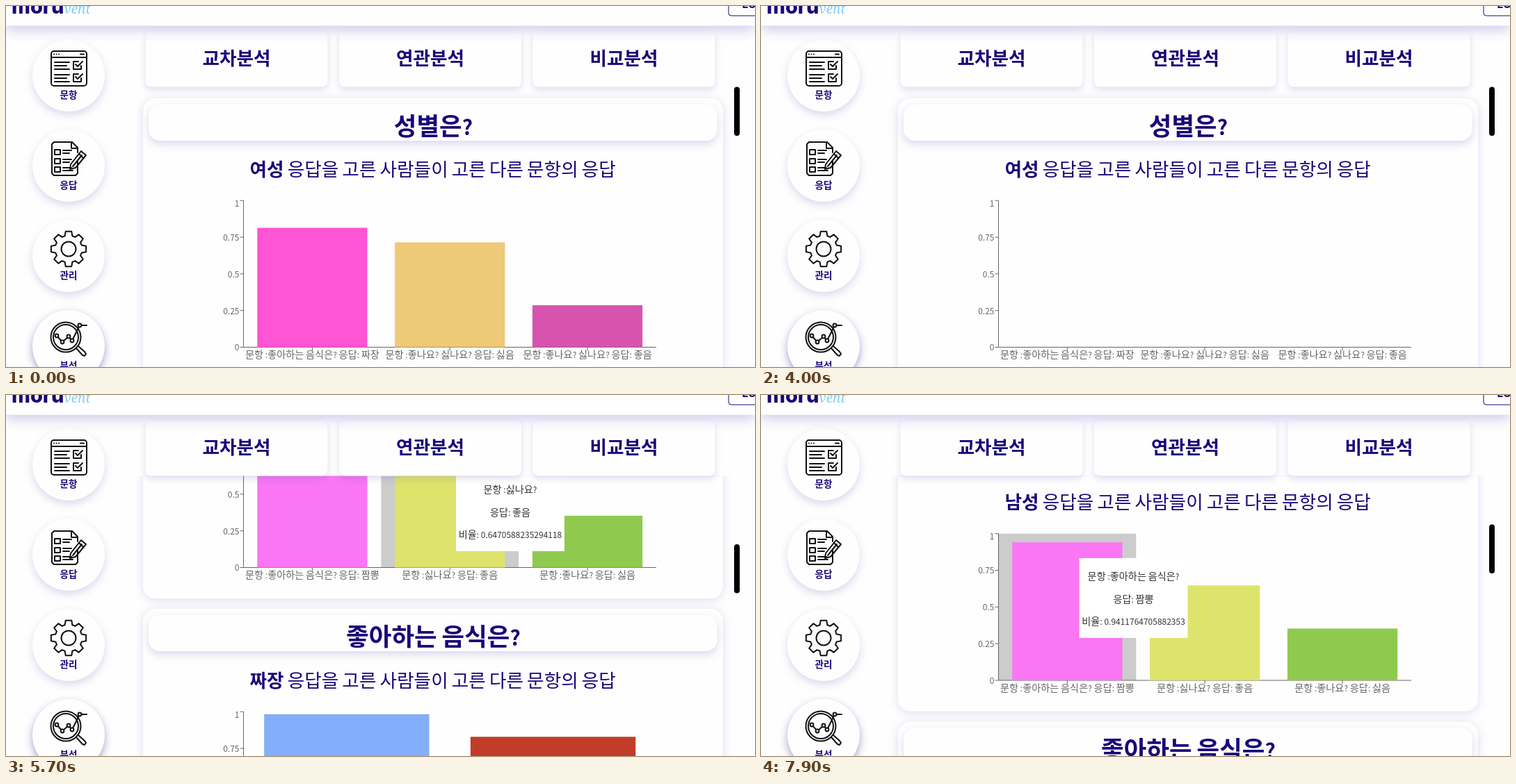
An HTML page with a canvas for the animation above (8000 ms loop, 1077 by 520 pixels).

```html
<!DOCTYPE html>
<html lang="ko">
<head>
<meta charset="utf-8">
<title>설문 분석</title>
<style>
html, body { margin: 0; width: 100%; height: 100%; overflow: hidden; background: #fefefe; }
canvas { display: block; width: 1077px; height: 520px; }
</style>
</head>
<body>
<canvas id="stage" width="1077" height="520"></canvas>
<script>
const ctx = document.getElementById('stage').getContext('2d');
const LOOP = 8000, STEP = 100;
const NAVY = '#1a0778', PAPER = '#fefefe', GREY = '#666';
const RED = '#f42a55', BLUE = '#82b1da';
const KR = '"Noto Sans CJK KR", "Noto Sans CJK JP", sans-serif';
const LATIN = 0.845;
const VIEW_TOP = 116.5;
const PLOT = { x: 341.5, w: 593.5, h: 211.3 };

// ---- timing helpers ----
const clamp = v => Math.max(0, Math.min(1, v));
const lerp = (a, b, k) => a + (b - a) * k;

// cubic-bezier(.25, .1, .25, 1)
function ease(x) {
  x = clamp(x);
  if (x === 0 || x === 1) return x;
  const at = (s, a, b) => 3 * (1 - s) * (1 - s) * s * a + 3 * (1 - s) * s * s * b + s * s * s;
  let lo = 0, hi = 1;
  for (let i = 0; i < 24; i++) {
    const mid = (lo + hi) / 2;
    if (at(mid, 0.25, 0.25) < x) lo = mid; else hi = mid;
  }
  return at(lo, 0.1, 1);
}

function track(t, keys) {
  if (t <= keys[0][0]) return keys[0][1];
  for (let i = 1; i < keys.length; i++) {
    const [t0, a] = keys[i - 1], [t1, b] = keys[i];
    if (t <= t1) return lerp(a, b, (t - t0) / (t1 - t0));
  }
  return keys[keys.length - 1][1];
}

const scrollAt = t => track(t, [
  [4600, 0], [4700, 11], [4800, 75], [5100, 320], [5200, 384],
  [5400, 560], [6900, 560], [7900, 397.5]
]);

// ---- drawing helpers ----
function shape(x, y, w, h, r, fill, shadow) {
  ctx.save();
  if (shadow) [ctx.shadowColor, ctx.shadowOffsetY, ctx.shadowBlur] = shadow;
  ctx.fillStyle = fill;
  ctx.beginPath();
  ctx.roundRect(x, y, w, h, r);
  ctx.fill();
  ctx.restore();
}

function rect(x, y, w, h, fill) {
  ctx.fillStyle = fill;
  ctx.fillRect(x, y, w, h);
}

function line(points, close) {
  ctx.beginPath();
  points.forEach(([x, y], i) => i ? ctx.lineTo(x, y) : ctx.moveTo(x, y));
  if (close) ctx.closePath();
  ctx.stroke();
}

function ring(x, y, r) {
  ctx.beginPath();
  ctx.arc(x, y, r, 0, 7);
  ctx.stroke();
}

function dot(x, y, r, fill) {
  ctx.fillStyle = fill;
  ctx.beginPath();
  ctx.arc(x, y, r, 0, 7);
  ctx.fill();
}

// Latin runs are set a little smaller than Hangul; y is the visual middle.
function text(str, x, y, size, color, weight = 350, align = 0.5) {
  const runs = str.match(/[가-힣]+|[^가-힣]+/g).map(s => {
    const font = `${weight} ${/[가-힣]/.test(s) ? size : size * LATIN}px ${KR}`;
    ctx.font = font;
    return { s, font, w: ctx.measureText(s).width };
  });
  const total = runs.reduce((sum, r) => sum + r.w, 0);
  const base = y + size * (/[가-힣]/.test(str) ? 0.37 : 0.31);
  x -= total * align;
  ctx.fillStyle = color;
  for (const r of runs) {
    ctx.font = r.font;
    ctx.fillText(r.s, x, base);
    x += r.w;
  }
  return x;
}

// ---- sidebar icons, drawn around (0, 0) in a 52 px box ----
function formIcon() {
  ctx.beginPath();
  ctx.roundRect(-25, -25, 51, 50, 4);
  ctx.stroke();
  line([[-25, -16], [26, -16]]);
  for (const x of [-21, -17.5, -14]) dot(x, -20.5, 1, '#111');
  line([[17, -20.5], [22, -20.5]]);
  for (const y of [-10, 8]) {
    for (const [dy, end] of [[1, 1], [6, -3], [11, 1]]) line([[-20, y + dy], [end, y + dy]]);
    line([[14, y], [7, y], [7, y + 11], [18, y + 11], [18, y + 6]]);
    line([[10, y + 4], [13, y + 7], [20, y]]);
  }
}

function noteIcon() {
  line([[13, 4], [13, 21], [10, 24], [-21, 24], [-24, 21], [-24, -21], [-21, -24], [5, -24], [13, -16], [13, -9]]);
  line([[4, -24], [4, -15], [13, -15]]);
  for (const y of [-13, 0, 12]) {
    ctx.strokeRect(-20, y, 8, 7);
    line([[-8, y + 1], [4, y + 1]]);
    line([[-8, y + 5], [y === 12 ? 6 : 1, y + 5]]);
  }
  line([[3, 8], [18, -11], [25, -5], [10, 13], [2, 15]], true);
  line([[15, -7], [21, -1]]);
  line([[6, 11], [19, -5]]);
}

function gearIcon() {
  const pts = [];
  for (let i = 0; i < 8; i++) {
    for (const [d, r] of [[-0.28, 19.5], [-0.17, 25.5], [0.17, 25.5], [0.28, 19.5]]) {
      const a = i * Math.PI / 4 + d;
      pts.push([r * Math.cos(a), r * Math.sin(a)]);
    }
  }
  line(pts, true);
  ring(0, 0, 10.5);
}

function lensIcon() {
  ring(-4, -3, 21.5);
  ring(-4, -3, 18);
  line([[11, 13], [20, 23], [23, 24], [25, 21], [23, 18], [14, 10]]);
  const path = [[-17, -5], [-9, 4], [0, -4], [5, 2], [16, -20]];
  line(path);
  line([[19, -20], [26, -20]]);
  for (const [x, y] of path) {
    dot(x, y, 2.4, PAPER);
    ring(x, y, 2.4);
  }
}

function sidebar() {
  const items = [['문항', formIcon], ['응답', noteIcon], ['관리', gearIcon], ['분석', lensIcon]];
  items.forEach(([label, icon], i) => {
    const y = 100 + 130 * i;
    const tint = i === 3 ? 'rgba(60,50,150,.45)' : 'rgba(90,85,180,.22)';
    shape(38, y - 52, 104, 104, 52, PAPER, [tint, 5, 12]);
    ctx.save();
    ctx.translate(90, y - 10);
    ctx.strokeStyle = '#111';
    ctx.lineWidth = 2;
    ctx.lineJoin = ctx.lineCap = 'round';
    icon();
    ctx.restore();
    text(label, 90, y + 28, 13.6, NAVY, 700);
  });
}

// ---- fixed top parts ----
function tabs() {
  ['교차분석', '연관분석', '비교분석'].forEach((label, i) => {
    const x = 200.5 + 278.5 * i;
    shape(x, 36, 262, 80.5, 8, PAPER, ['rgba(90,85,180,.2)', 4, 10]);
    text(label, x + 131, 75, 26.7, NAVY, 700);
  });
}

function header() {
  shape(0, -30, 1077, 58.5, 0, PAPER, ['rgba(110,110,190,.33)', 6, 16]);
  ctx.fillStyle = NAVY;
  ctx.font = '800 29px Inter, sans-serif';
  ctx.fillText('moru', 8, 10.5);
  const x = 8 + ctx.measureText('moru').width;
  ctx.fillStyle = '#83cdf6';
  ctx.font = 'italic 19px "Noto Serif", serif';
  ctx.fillText('vent', x, 10.5);
  ctx.strokeStyle = NAVY;
  ctx.lineWidth = 1;
  ctx.beginPath();
  ctx.roundRect(1039, -24, 80, 38, 4);
  ctx.stroke();
  ctx.fillStyle = NAVY;
  ctx.font = `700 16px ${KR}`;
  ctx.fillText('LOGOUT', 1058, 2.5);
}

// ---- content ----
const DISH = '문항 :좋아하는 음식은?';
const LIKE = '문항 :좋나요? 싫나요?';
const charts = {
  women: {
    who: '여성', values: [0.814, 0.715, 0.286],
    names: [DISH + ' 응답: 짜장', LIKE + ' 응답: 싫음', LIKE + ' 응답: 좋음']
  },
  men: {
    who: '남성', values: [16 / 17, 11 / 17, 6 / 17], colors: ['#fa76f4', '#dee36b', '#8fca4f'],
    names: [DISH + ' 응답: 짬뽕', '문항 :싫나요? 응답: 좋음', '문항 :좋나요? 응답: 싫음']
  },
  dish: {
    who: '짜장', values: [0.983, 0.829], colors: ['#84aef9', '#c13d2a'],
    names: ['문항 :성별은? 응답: 여성', '문항 :좋나요? 응답: 싫음']
  }
};
const WOMEN_FIRST = ['#ff54d3', '#edc978', '#d654ae'];
const WOMEN_AGAIN = ['#ff5a05', '#40eb56', '#de4f8b'];
const tips = [
  [DISH, '응답: 짬뽕', '비율: 0.9411764705882353', 156],
  ['문항 :싫나요?', '응답: 좋음', '비율: 0.6470588235294118', 156],
  ['문항 :좋나요?', '응답: 싫음', '비율: 0.35294117647058826', 162]
];

function panel(y, h, title) {
  shape(197, y, 834, h, 18, PAPER, ['rgba(90,85,180,.2)', 2, 14]);
  shape(205, y + 9, 817.5, 52, 16, PAPER, ['rgba(90,85,180,.22)', 5, 12]);
  text(title, 614.5, y + 40, 35.5, NAVY, 700);
}

function barChart(y, chart, colors, grow = 1, hover = -1) {
  const end = text(chart.who, 350.5, y, 26.7, NAVY, 700, 0);
  text(' 응답을 고른 사람들이 고른 다른 문항의 응답', end, y, 26.7, NAVY, 350, 0);
  const base = y + 256.5, top = base - PLOT.h;
  const band = PLOT.w / chart.values.length;
  if (hover >= 0) rect(PLOT.x + band * hover, top, band, PLOT.h, '#ccc');
  ctx.strokeStyle = GREY;
  ctx.lineWidth = 1;
  line([[PLOT.x, top], [PLOT.x, base]]);
  line([[PLOT.x, base], [PLOT.x + PLOT.w, base]]);
  for (let i = 0; i <= 4; i++) {
    const ty = base - PLOT.h * i / 4;
    line([[PLOT.x - 5, ty], [PLOT.x, ty]]);
    text(String(i / 4), 335.5, ty + (i === 4 ? 4 : 0.5), 14.2, GREY, 350, 1);
  }
  chart.values.forEach((v, i) => {
    const x = PLOT.x + band * i, h = PLOT.h * v * grow, mid = x + band / 2;
    line([[mid, base], [mid, base + 5]]);
    rect(x + band * 0.1, base - h, band * 0.8, h, colors[i]);
    text(chart.names[i], mid, base + 10.5, 14.2, GREY);
  });
}

function tooltip(x, y, index) {
  const [ask, answer, share, w] = tips[index];
  rect(x, y, w, 115, '#fff');
  [ask, answer, share].forEach((s, i) => text(s, x + w / 2, y + [26, 59, 90.5][i], 14.2, '#333'));
}

// Which bar is hovered and where its box stands on the stage.
function hoverAt(t, scroll) {
  if (t < 5200 || (t >= 5400 && t < 5600)) return null;
  if (t < 5400) return { i: 1, x: lerp(280, 647, ease((t - 5185) / 400)), y: 593 - scroll };
  if (t < 6600) return { i: 1, x: 647, y: track(t, [[5500, 118], [5800, 106], [6000, 106], [6500, 95]]) };
  if (t < 7600) return { i: 2, x: lerp(647, 665, ease((t - 6560) / 400)), y: 655 - scroll };
  const k = ease((t - 7600) / 400);
  return { i: 0, x: lerp(665, 449, k), y: lerp(655, 631.5, k) - scroll };
}

function barPage(t) {
  const again = t >= 4000;
  const scroll = again ? scrollAt(t) : 0;
  const grow = again ? ease((t - 4000) / 400) : 1;
  const tip = again ? hoverAt(t, scroll) : null;
  panel(133 - scroll, 720, '성별은?');
  barChart(235 - scroll, charts.women, again ? WOMEN_AGAIN : WOMEN_FIRST, grow);
  barChart(552 - scroll, charts.men, charts.men.colors, grow, tip ? tip.i : -1);
  panel(868 - scroll, 720, '좋아하는 음식은?');
  barChart(971 - scroll, charts.dish, charts.dish.colors, grow);
  if (tip) tooltip(tip.x, tip.y, tip.i);
  return { top: 116.5 + scroll / 5.68, size: 70.5 };
}

// Angles in degrees, counter-clockwise from the right.
function sector(from, to, inner, outer, fill, edge) {
  if (to <= from) return;
  const a = -from * Math.PI / 180, b = -to * Math.PI / 180;
  ctx.beginPath();
  ctx.arc(614, 335.5, outer, a, b, true);
  ctx.arc(614, 335.5, inner, b, a, false);
  ctx.closePath();
  ctx.fillStyle = fill;
  ctx.fill();
  if (edge) {
    ctx.strokeStyle = '#fff';
    ctx.lineWidth = 1;
    ctx.stroke();
  }
}

function donutPage(t) {
  panel(133, 370, '성별은?');
  const k = t < 1900 ? ease((t - 900) / 1500) : 1;
  const second = (t >= 1900 && t < 2100) || (t >= 2300 && t < 2900);
  const cut = 300 * k, end = 360 * k;
  sector(0, cut, 49, 98, RED, true);
  sector(cut, end, 49, 98, BLUE, true);

  const color = second ? BLUE : RED, side = second ? 1 : -1;
  if (second) sector(cut, end, 102.7, 106, color);
  else sector(0, cut, 102.7, 106, color);
  text(second ? '여자' : '남자', 614, 336, 14.2, color);

  const at = (dx, dy) => [614 + side * dx, 335.5 + side * dy];
  const tail = at(124, 61);
  ctx.strokeStyle = color;
  ctx.lineWidth = 1;
  line([at(91.5, 53), at(105.5, 61), tail]);
  dot(...tail, 2, color);
  const tx = 614 + side * 133.5, align = second ? 0 : 1;
  text('결과값: ' + (second ? 1 : 5), tx, tail[1] - 5, 14.2, '#333', 350, align);
  text(`(비율 ${second ? '16.67' : '83.33'}%)`, tx, tail[1] + 10, 14.2, '#999', 350, align);

  [['남자', RED], ['여자', BLUE]].forEach(([label, fill], i) => {
    rect(565 + 49 * i, 472, 11.5, 9, fill);
    text(label, 580 + 49 * i, 474.5, 14.2, fill, 350, 0);
  });
  return { top: 116.5, size: 209.5 };
}

function draw(t) {
  rect(0, 0, 1077, 520, PAPER);
  sidebar();
  ctx.save();
  ctx.beginPath();
  ctx.rect(181, VIEW_TOP, 866, 520 - VIEW_TOP);
  ctx.clip();
  const thumb = t >= 600 && t < 4000 ? donutPage(t) : barPage(t);
  ctx.restore();
  shape(1047, thumb.top, 8, thumb.size, 4, '#000');
  tabs();
  header();
}

const start = performance.now();
function tick() {
  const t = (performance.now() - start) % LOOP;
  draw(Math.floor(t / STEP) * STEP);
  requestAnimationFrame(tick);
}
tick();
</script>
</body>
</html>
```
